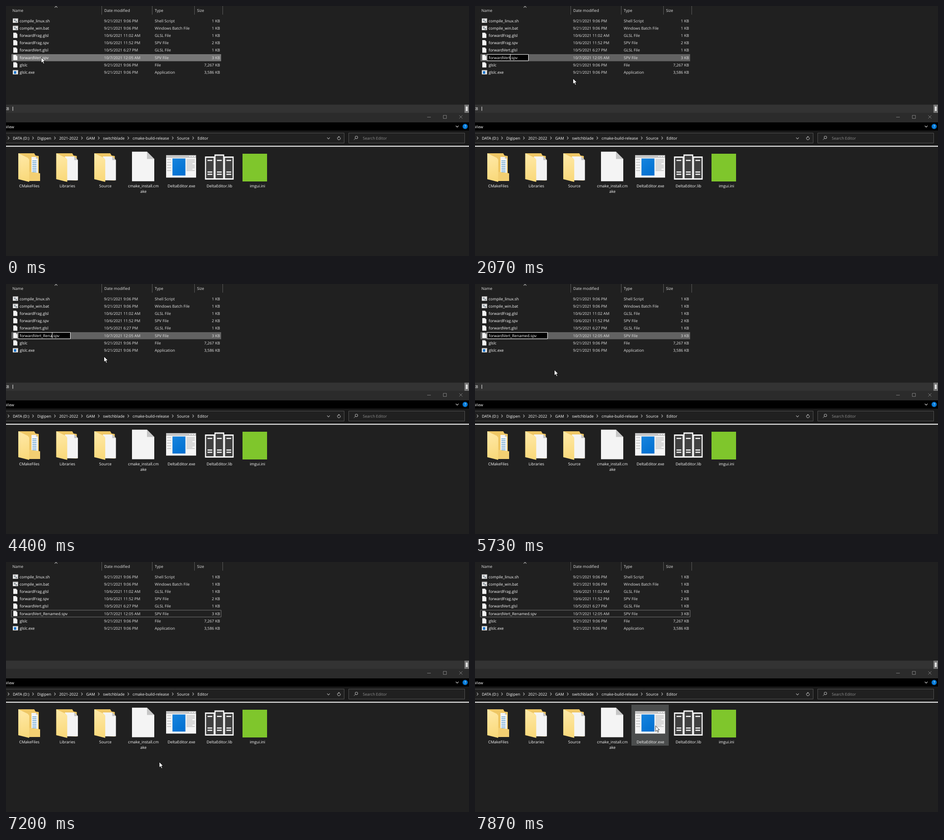
An HTML page with a canvas that plays this animation: 1018x550 px, repeating every 8 s.

```html
<!DOCTYPE html>
<html lang="en">
<head>
<meta charset="utf-8">
<title>File rename</title>
<style>
html, body { margin: 0; width: 100%; height: 100%; overflow: hidden; background: #202020; }
canvas { display: block; }
</style>
</head>
<body>
<canvas id="stage" width="1018" height="550"></canvas>
<script>
const ctx = document.getElementById('stage').getContext('2d');
const LOOP = 8000, FPS = 15;
const FONT = '500 8.55px "Open Sans", "Noto Sans", sans-serif';
const SOFT = '#e4e4e4', GREY = '#a8a8a8', DIM = '#7d7d7d', PAPER = '#f4f4f4';

const columns = { 'Name': 14, 'Date modified': 216, 'Type': 327, 'Size': 420 };
const files = [
  ['compile_linux.sh', '9/21/2021 9:06 PM', 'Shell Script', '1 KB'],
  ['compile_win.bat', '9/21/2021 9:06 PM', 'Windows Batch File', '1 KB'],
  ['forwardFrag.glsl', '10/6/2021 11:02 AM', 'GLSL File', '1 KB'],
  ['forwardFrag.spv', '10/6/2021 11:52 PM', 'SPV File', '2 KB'],
  ['forwardVert.glsl', '10/5/2021 6:27 PM', 'GLSL File', '1 KB'],
  ['forwardVert.spv', '10/7/2021 12:05 AM', 'SPV File', '3 KB'],
  ['glslc', '9/21/2021 9:06 PM', 'File', '7,267 KB'],
  ['glslc.exe', '9/21/2021 9:06 PM', 'Application', '3,586 KB']
];
const EDITED = 5;
const crumbs = ['DATA (D:)', 'Digipen', '2021-2022', 'GAM', 'switchblade',
  'cmake-build-release', 'Source', 'Editor'];
const tiles = ['CMakeFiles', 'Libraries', 'Source', 'cmake_install.cm|ake',
  'DeltaEditor.exe', 'DeltaEditor.lib', 'imgui.ini'];

// Steps of the rename, at 15 per second
const OPEN = 20, DESELECT = 26, LEAVE = 28, COMMIT = 87, BLUR = 92, SWITCH = 96;

// Keys pressed ('<' is backspace) and the step of each
const keys = '_Renae<med', keySteps = [42, 49, 51, 54, 56, 59, 66, 69, 71, 74];

// Pointer moves: first step, last step, end point
const moves = [
  [0, 2, 79, 114.5],
  [27, 31, 215.5, 159.5],
  [82, 86, 174.5, 189],
  [95, 97, 149, 272],
  [97, 101, 117, 478],
  [101, 103, 120.5, 451],
  [105, 108, 337, 440],
  [108, 112, 556, 358],
  [112, 118, 397, 360.5]
];

const clamp = k => Math.max(0, Math.min(1, k));
const ease = k => 1 - (1 - k) ** 1.3;

function pointerAt(step) {
  let x = 77.5, y = 113;
  for (const [from, to, tx, ty] of moves) {
    const k = ease(clamp((step - from) / (to - from)));
    x += (tx - x) * k;
    y += (ty - y) * k;
  }
  return { x, y };
}

function stemAt(step) {
  return [...keys].filter((c, i) => keySteps[i] <= step)
    .reduce((s, c) => c === '<' ? s.slice(0, -1) : s + c, 'forwardVert');
}

// The caret blinks off after eight idle steps
function caretOn(step) {
  if (step < DESELECT) return false;
  const last = keySteps.filter(k => k <= step).pop() || 30;
  return Math.floor((step - last) / 8) % 2 === 0;
}

function rect(x, y, w, h, color) {
  ctx.fillStyle = color;
  ctx.fillRect(x, y, w, h);
}
function frame(x, y, w, h, color) {
  ctx.strokeStyle = color;
  ctx.lineWidth = 1;
  ctx.strokeRect(x + 0.5, y + 0.5, w - 1, h - 1);
}
function trace(pts) {
  ctx.beginPath();
  pts.forEach(([x, y]) => ctx.lineTo(x, y));
}
function poly(pts, color) {
  trace(pts);
  ctx.closePath();
  ctx.fillStyle = color;
  ctx.fill();
}
function line(pts, color, width = 1) {
  trace(pts);
  ctx.strokeStyle = color;
  ctx.lineWidth = width;
  ctx.stroke();
}
function arc(x, y, r, from = 0, to = 7) {
  ctx.beginPath();
  ctx.arc(x, y, r, from, to);
}
function disc(x, y, r, color) {
  arc(x, y, r);
  ctx.fillStyle = color;
  ctx.fill();
}
function shade(x, y, w, h, from, to) {
  const g = ctx.createLinearGradient(x, y, x + w, y + h);
  g.addColorStop(0, from);
  g.addColorStop(1, to);
  return g;
}
function text(s, x, mid, color = '#fff', align = 'left') {
  ctx.fillStyle = color;
  ctx.textAlign = align;
  ctx.fillText(s, x, mid + 3.1);
}
const width = s => ctx.measureText(s).width;

function chevron(x, y, dx, dy, color) {
  const pts = dx ? [[x - dx, y - 3], [x + dx, y], [x - dx, y + 3]]
                 : [[x - 3, y - dy], [x, y + dy], [x + 3, y - dy]];
  line(pts, color, 1.1);
}

// A sheet with its top right corner folded
function page(x, y, w, h, fold) {
  const r = x + w;
  poly([[x, y], [r - fold, y], [r, y + fold], [r, y + h], [x, y + h]], PAPER);
  poly([[r - fold, y], [r, y + fold], [r - fold, y + fold]], '#c6c6c6');
}

function smallIcon(name, y) {
  if (!/sh$|bat$|exe$/.test(name)) return page(16, y - 6, 9, 11.5, 3);
  rect(15, y - 5, 11.5, 9.5, '#e9e9e9');
  rect(15, y - 5, 11.5, 1.5, '#bdbdbd');
  if (name.endsWith('exe')) return rect(17.5, y - 2.5, 5, 5.5, '#0b6fcb');
  disc(19.3, y - 0.8, 2.1, '#8d969c');
  disc(22.8, y + 1.8, 1.9, '#8d969c');
}

function editBox(step, mid) {
  const stem = stemAt(step), name = stem + '.spv';
  const w = Math.round(width(name) + 29), caret = 30 + width(stem);
  rect(26, 106, w, 15, '#000');
  frame(26, 106, w, 15, '#fff');
  if (step < DESELECT) rect(30, 107, caret - 30, 12, '#0078d7');
  text(name, 30, mid);
  if (caretOn(step)) rect(Math.floor(caret), 107, 1, 12, '#fff');
}

function fileRow(step, i, hover) {
  const [name, date, type, size] = files[i], y = 32.4 + 16.22 * i;
  const edited = i === EDITED;
  if (edited && step < BLUR) rect(12, 106, 461, 15.5, hover ? '#777777' : '#626262');
  else if (hover) rect(12, Math.round(y - 7.8), 461, 16, '#4d4d4d');
  if (edited && step >= BLUR) frame(11.5, 105.5, 462, 16, '#777777');
  smallIcon(name, y);
  if (edited && step >= OPEN && step < COMMIT) editBox(step, y);
  else text(edited && step >= COMMIT ? stemAt(step) + '.spv' : name, 30, y);
  text(date, 215.5, y, SOFT);
  text(type, 327, y, SOFT);
  text(size, 470.5, y, SOFT, 'right');
}

function fileList(step, p, arrow) {
  for (const name in columns) text(name, columns[name], 9.7, SOFT);
  [210, 321, 414, 476].forEach(x => rect(x, 0, 1, 19, '#5c5c5c'));
  chevron(110, 2, 0, -1.5, GREY);
  const over = arrow && p.x > 12 && p.x < 473 ? Math.floor((p.y - 24.3) / 16.22) : -1;
  files.forEach((f, i) => fileRow(step, i, i === over));
}

function statusBar(step) {
  rect(0, 217, 1018, 18, '#333333');
  if (step < SWITCH) {
    text('KB', -4, 226);
    rect(14.5, 221.5, 1, 9, '#fff');
  }
  rect(1008, 217, 10, 18, '#777777');
  for (let i = 0; i < 3; i++) rect(1011, 221.5 + i * 3.2, 4, 2.7, '#fff');
}

function titleBar() {
  rect(0, 235, 1018, 21, '#2b2b2b');
  rect(926, 244, 8, 1, DIM);
  frame(961, 240, 8, 8, DIM);
  line([[996.5, 240.5], [1003.5, 247.5]], DIM);
  line([[1003.5, 240.5], [996.5, 247.5]], DIM);
  rect(0, 256, 1018, 18, '#000');
  text('View', -0.5, 265.7);
  chevron(992, 265, 0, 1.7, '#d0d0d0');
  disc(1009.5, 265, 5.7, '#0078d7');
  text('?', 1009.5, 265, '#fff', 'center');
}

function field(x, w) {
  rect(x, 279, w, 23, '#202020');
  frame(x, 279, w, 23, '#535353');
}

function addressBar() {
  rect(0, 274, 1018, 34, '#191919');
  field(-2, 746);
  field(753, 256);
  let x = 15;
  for (const crumb of crumbs) {
    chevron(x - 9.5, 290.5, 1.4, 0, GREY);
    text(crumb, x, 290.5);
    x += width(crumb) + 17.6;
  }
  chevron(709, 291, 0, 1.7, GREY);
  ctx.lineWidth = 1.1;
  ctx.strokeStyle = GREY;
  arc(732, 291, 3.2, -0.6, 4.3);
  ctx.stroke();
  poly([[731, 286], [734.5, 288], [731, 290]], GREY);
  arc(770.5, 289, 2.8);
  ctx.stroke();
  line([[768.5, 291], [765, 294.5]], GREY);
  text('Search Editor', 784.5, 290.5, '#8f8f8f');
  rect(0, 307.5, 1018, 2, '#fff');
}

function folder(x, nested) {
  poly([[x, 324], [x + 35, 324], [x + 38, 329], [x + 45, 330], [x + 45, 384], [x, 381]], '#efc765');
  if (nested) {
    page(x + 29, 332, 14, 44, 4);
    for (let y = 340; y < 366; y += 4) rect(x + 31, y, 9, 1.5, '#5a9fd4');
    poly([[x + 20, 364], [x + 48, 368], [x + 48, 385], [x + 20, 385]], '#f3cf72');
  } else page(x + 19, 331, 28.5, 52.5, 8);
  poly([[x, 324], [x + 21, 334], [x + 24, 338], [x + 24, 387], [x, 381]],
    shade(x, 324, 20, 63, '#ffeaa9', '#f9d878'));
}

function programIcon(x, y) {
  rect(x, y, 66, 49.5, PAPER);
  rect(x, y, 66, 6, '#c4c4c4');
  for (let i = 0; i < 9; i++) {
    const ly = y + 9.5 + i * 3;
    rect(x + 45, ly, i % 4 === 3 ? 13 : 18, 1, GREY);
    if (i % 2 === 0) rect(x + 2, ly, 9, 1, GREY);
    if (i < 3) rect(x + 51 + i * 5, y + 2, 3, 2, PAPER);
  }
  rect(x + 14, y + 7.5, 28.5, 37.5, shade(x + 14, y + 8, 28, 37, '#1684de', '#006fd0'));
}

function libraryIcon(x) {
  for (let i = 0; i < 3; i++) {
    const bx = x + i * 20.8, top = i === 1 ? 326.5 : 331;
    rect(bx, top, 21.5, 382 - top, PAPER);
    rect(bx + 2.5, top + 3, 16.5, 376 - top, '#414141');
    [338.5, 364, 369].forEach(y => rect(bx + 5.5, y, 10.5, 2.5, PAPER));
  }
}

function tileGrid(p, arrow) {
  tiles.forEach((label, i) => {
    const x = 10 + i * 83.6, lines = label.split('|');
    const h = 78 + lines.length * 12;
    if (arrow && p.x > x && p.x < x + 81.5 && p.y > 314 && p.y < 314 + h)
      rect(Math.round(x), 314, 82, h, '#4b4d4d');
    lines.forEach((s, n) => text(s, x + 41.3, 396.3 + n * 11.8, '#fff', 'center'));
    if (i < 3) folder(x + 17, i === 0);
  });
  page(277, 320.5, 49, 65, 16);
  programIcon(352, 328);
  libraryIcon(437.5);
  rect(520, 325, 54, 61, '#7fc62c');
}

function drawPointer({ x, y }) {
  const shape = [[0, 0], [0, 12.2], [2.8, 9.6], [4.9, 14.2], [6.8, 13.3], [4.8, 8.8], [8.5, 8.6], [0, 0]]
    .map(([a, b]) => [x + a, y + b]);
  poly(shape, '#fff');
  ctx.lineJoin = 'round';
  line(shape, '#000', 0.8);
}

function drawBeam({ x, y }) {
  rect(x + 0.5, y - 6, 1, 12, '#fff');
  rect(x - 1.5, y - 6, 5, 1, '#fff');
  rect(x - 1.5, y + 5, 5, 1, '#fff');
}

function draw(ms) {
  const step = Math.floor(ms * FPS / 1000 + 0.06);
  const p = pointerAt(step);
  const beam = step >= OPEN && step < LEAVE;
  ctx.font = FONT;
  ctx.textRendering = 'geometricPrecision';
  rect(0, 0, 1018, 550, '#202020');
  fileList(step, p, !beam);
  statusBar(step);
  titleBar();
  addressBar();
  tileGrid(p, !beam);
  if (beam) drawBeam(p);
  else drawPointer(p);
}

const start = performance.now();
function tick() {
  draw((performance.now() - start) % LOOP);
  requestAnimationFrame(tick);
}
tick();
</script>
</body>
</html>
```
